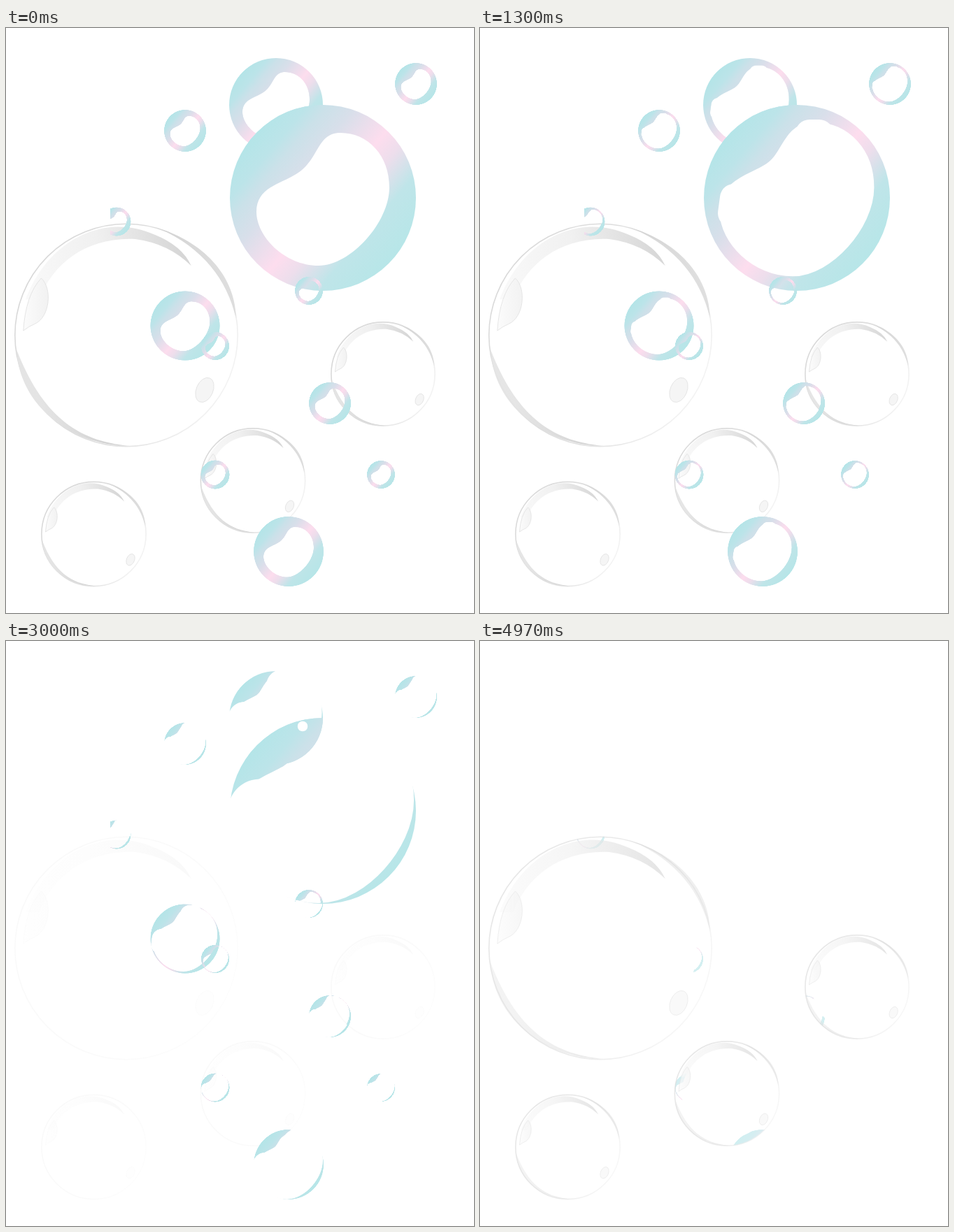
Recreate the animation shown at these times as an HTML page with a canvas. Size 669 px wide and 837 px high, loop 5010 ms.

```html
<!DOCTYPE html>
<html lang="en">
<head>
<meta charset="utf-8">
<title>Bubbles</title>
<style>
html, body { margin: 0; width: 100%; height: 100%; overflow: hidden; background: #fff; }
canvas { display: block; }
</style>
</head>
<body>
<canvas id="stage" width="669" height="837"></canvas>
<script>
const ctx = document.getElementById('stage').getContext('2d');
const LOOP = 5010, COLOR_PERIOD = 1100, GLASS_PERIOD = 3850 / 3, R = 133;

// x, y, radius
const colored = [
  [386, 110, 67], [453, 243, 133], [586, 80, 30], [256, 147, 30],
  [158, 277, 20.5], [256, 426, 49.5], [299, 455, 20], [433, 376, 20],
  [463, 537, 30], [299, 639, 20.5], [536, 639, 20], [404, 749, 50]
];
const glass = [[172, 439.5, 160], [539, 495, 74.5], [353, 647.5, 75], [125.5, 724, 75]];

const hole = new Path2D('M25-93C65-93 95-60 95-15C95 35 40 97-6 97C-55 97-95 55-95 20' +
  'C-95-15-60-20-40-33C-5-52-10-93 25-93Z');
// The two ends of the hole beside its dent grow faster than the rest
const lobes = new Path2D('M18-92L32-92M-90 0L-93 22');

// Glass parts, in units of the bubble radius
const shine = new Path2D('M-.9-.32C-.7-.85-.2-1.1.25-.9Q.5-.8.58-.62Q.38-.82.08-.86C-.35-.88-.65-.65-.78-.32Z');
const blob = new Path2D('M-.76-.51C-.66-.42-.68-.16-.82-.1Q-.87-.08-.92-.04Q-.9-.36-.76-.51Z');
const spot = new Path2D();
spot.ellipse(.7, .49, .075, .115, .4, 0, 7);
const rim = new Path2D('M-.98.13C-.96.62-.5.99.03.99C-.45.95-.76.7-.98.13Z' +
  'M.3-.95C.72-.82.98-.5.98-.15C.9-.5.68-.78.3-.95Z');
const edge = new Path2D();
edge.arc(0, 0, .995, 0, 7);

function gradient(c, x0, y0, x1, y1, stops) {
  const g = c.createLinearGradient(x0, y0, x1, y1);
  stops.forEach(([at, color]) => g.addColorStop(at, color));
  return g;
}

// Time from the nearest full state
function distance(t, period) {
  const m = t % period;
  return Math.min(m, period - m);
}

// One reusable ring image; weaker erosion is used where bubbles overlap
function makeRing(strength) {
  const canvas = document.createElement('canvas');
  canvas.width = canvas.height = 2 * R + 2;
  const c = canvas.getContext('2d');
  c.translate(R + 1, R + 1);
  c.lineJoin = c.lineCap = 'round';
  const fill = gradient(c, -102, -85.5, 102, 85.5, [
    [0, '#b4e5e8'], [.12, '#bce4e9'], [.2, '#cbe1e9'], [.32, '#d8dfea'],
    [.53, '#fdddee'], [.64, '#eddeec'], [.8, '#bfe5e9'], [1, '#b7e6e8']
  ]);
  return {
    canvas,
    update(d) {
      const grow = .00038 * strength * d * d + 20 * (d / 400) ** 10;
      c.globalCompositeOperation = 'source-over';
      c.clearRect(-R - 1, -R - 1, 2 * R + 2, 2 * R + 2);
      c.fillStyle = fill;
      c.beginPath();
      c.arc(0, 0, R, 0, 7);
      c.fill();
      c.globalCompositeOperation = 'destination-out';
      c.fill(hole);
      if (grow > 0) {
        c.lineWidth = 2 * grow;
        c.stroke(hole);
        c.lineWidth = 2.6 * grow;
        c.stroke(lobes);
      }
    }
  };
}
const ring = makeRing(1), inGlass = makeRing(.82), inColor = makeRing(.42);

function stamp(image, [x, y, r]) {
  const s = r * (R + 1) / R;
  ctx.drawImage(image.canvas, x - s, y - s, 2 * s, 2 * s);
}

function drawOverlaps(image, bubble, others) {
  const [x, y, r] = bubble;
  for (const [ox, oy, or] of others) {
    if (Math.hypot(ox - x, oy - y) > r + or) continue;
    ctx.save();
    ctx.beginPath();
    ctx.arc(ox, oy, or, 0, 7);
    ctx.clip();
    stamp(image, bubble);
    ctx.restore();
  }
}

function drawColored(d) {
  if (d > 450) return;
  [ring, inGlass, inColor].forEach(image => image.update(d));
  colored.forEach((b, i) => {
    ctx.save();
    if (i === 4) {
      ctx.beginPath();
      ctx.rect(149, 250, 40, 60);
      ctx.clip();
    }
    stamp(ring, b);
    drawOverlaps(inGlass, b, glass);
    drawOverlaps(inColor, b, colored.slice(0, i));
    ctx.restore();
    // Thin spot where the two largest bubbles overlap
    if (i === 1 && d > 290) {
      ctx.fillStyle = '#fff';
      ctx.beginPath();
      ctx.arc(424, 122, (d - 270) * .25, 0, 7);
      ctx.fill();
    }
  });
}

// Near the edge of the glass some color outlasts the colored bubbles
function drawResidue(alpha) {
  ring.update(250);
  for (const [x, y, r] of glass) {
    ctx.save();
    ctx.beginPath();
    ctx.arc(x, y, r, 0, 7);
    ctx.arc(x, y, r * .86, 0, 7);
    ctx.clip('evenodd');
    ctx.globalAlpha = alpha;
    colored.forEach(b => stamp(ring, b));
    ctx.restore();
  }
}

function drawGlass(d, colorGap) {
  const alpha = Math.max(0, 1 - d / 600) ** 1.5;
  const rimAlpha = Math.max(0, 1 - d / 290);
  if (!alpha) return;
  if (colorGap > 450) drawResidue(alpha);
  for (const [x, y, r] of glass) {
    ctx.save();
    ctx.translate(x, y);
    ctx.scale(r, r);

    ctx.globalAlpha = alpha;
    ctx.lineWidth = 1.6 / r;
    ctx.strokeStyle = gradient(ctx, -1, -.5, 1, .5, [[0, '#d8d8d8'], [.6, '#dedede'], [1, '#f6f6f6']]);
    ctx.stroke(edge);
    ctx.fillStyle = gradient(ctx, -.9, 0, .58, -.2, [[0, '#fafafa'], [.5, '#f0f0f0'], [1, '#d6d6d6']]);
    ctx.fill(shine);
    ctx.fillStyle = gradient(ctx, -.92, 0, -.66, 0, [[0, '#fbfbfb'], [1, '#f0f0f0']]);
    ctx.fill(blob);
    ctx.fillStyle = '#f5f5f5';
    ctx.fill(spot);
    ctx.lineWidth = .9 / r;
    ctx.strokeStyle = '#e2e2e2';
    ctx.stroke(blob);
    ctx.stroke(spot);

    ctx.globalAlpha = rimAlpha;
    ctx.fillStyle = gradient(ctx, -.9, .2, .9, -.4, [[0, '#e4e4e4'], [.3, '#cecece'], [.7, '#cecece'], [1, '#dddddd']]);
    ctx.fill(rim);
    ctx.restore();
  }
}

function frame() {
  const t = performance.now() % LOOP;
  const colorGap = distance(t, COLOR_PERIOD);
  ctx.fillStyle = '#fff';
  ctx.fillRect(0, 0, 669, 837);
  drawGlass(distance(t, GLASS_PERIOD), colorGap);
  drawColored(colorGap);
  requestAnimationFrame(frame);
}
frame();
</script>
</body>
</html>
```
